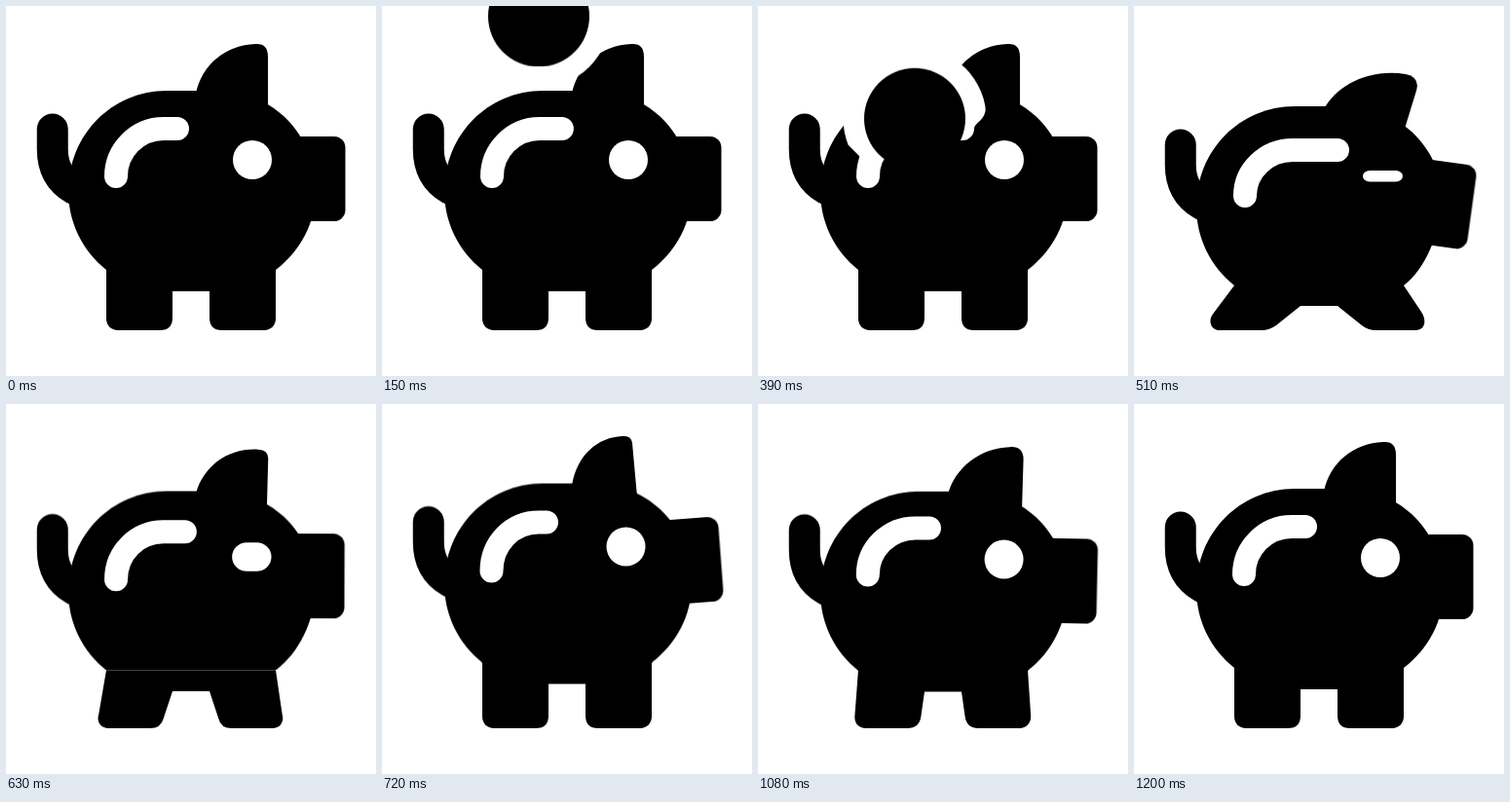
Animation, 380 px wide and 380 px high, one loop 1230 ms. Source, as an HTML page without scripts:

```html
<!DOCTYPE html>
<html lang="en">
<head>
<meta charset="utf-8">
<title>Piggy bank</title>
<style>
html, body { margin: 0; width: 100%; height: 100%; overflow: hidden; background: #fff; }
svg { display: block; width: 100vw; height: 100vh; }
.move { animation: 1230ms ease-in-out infinite; }

/* Poses: rest, squash 41.46%, stretch 58.54%, small squash 75.61%, rest */
.body { animation-name: body; }
@keyframes body {
  0%, 31.71%, 97.56%, 100% { transform: none; }
  41.46% { transform: translateY(16px); }
  58.54% { transform: translateY(-5.5px); }
  75.61% { transform: translateY(7px); }
}

.belly { animation-name: belly; }
@keyframes belly {
  0%, 31.71%, 58.54%, 97.56%, 100% { d: path("M165 87L217 87C274 87 318 132 318 190C318 222 303 251 277 271L103 271C79 252 64 223 64 190C64 132 109 87 165 87Z"); }
  41.46% { d: path("M165 87L217 87C274 87 318 132 318 190C312 218 300 254 277 271L103 271C79 252 64 223 64 190C64 132 109 87 165 87Z"); }
  75.61% { d: path("M165 87L217 87C274 87 318 132 318 190C315 220 301 253 277 271L103 271C79 252 64 223 64 190C64 132 109 87 165 87Z"); }
}

.snout { transform-origin: 348px 177.5px; animation-name: snout; }
@keyframes snout {
  0%, 31.71%, 97.56%, 100% { transform: translate(0, 0) rotate(0deg); }
  41.46% { transform: translate(-1.5px, 30px) rotate(7.8deg); }
  58.54% { transform: translate(-.5px, -18.7px) rotate(-4.3deg); }
  75.61% { transform: translate(-.5px, 12px) rotate(3deg); }
}

.ear { animation-name: ear; }
@keyframes ear {
  0%, 31.71%, 97.56%, 100% { d: path("M195 90C201 60 226 40 256 39Q269 38 269 52L269 130L200 130Z"); }
  41.46% { d: path("M195 106C208 82 240 64 279 70Q294 73 290 87L278 126L200 130Z"); }
  58.54% { d: path("M195 84C200 52 222 34 247 33Q256 32 257 40L262 95L200 130Z"); }
  75.61% { d: path("M195 97C205 72 232 53 262 52Q279 51 278 66L273 115L200 130Z"); }
}

.legs { animation-name: legs; }
@keyframes legs {
  0%, 31.71%, 97.56%, 100% { d: path("M103 270L103 321C103 328 108 333 115 333L158 333Q171 333 171 320L171 293L209 293L209 320Q209 333 222 333L265 333C272 333 277 328 277 321L277 270Z"); }
  41.46% { d: path("M103 287L82 315C75 323 79 333 88 333L131 333Q139 333 146 328L171 308L209 308L234 328Q240 333 249 333L289 333C299 333 301 323 295 314L277 287Z"); }
  58.54% { d: path("M103 265L103 321C103 328 108 333 115 333L158 333Q171 333 171 320L171 287.5L209 287.5L209 320Q209 333 222 333L265 333C272 333 277 328 277 321L277 265Z"); }
  75.61% { d: path("M103 277L94 319C92 327 96 333 104 333L146 333Q158 333 162 322L171 299L209 299L218 322Q222 333 233 333L274 333C282 333 286 327 285 319L277 277Z"); }
}

.eye { animation-name: eye; }
@keyframes eye {
  0%, 31.71%, 97.56%, 100% { x: 233px; y: 138px; width: 40px; height: 40px; rx: 20px; ry: 20px; }
  41.46% { x: 235px; y: 169px; width: 41px; height: 11.5px; rx: 7px; ry: 5.75px; }
  58.54% { x: 230.5px; y: 126.5px; width: 40px; height: 40px; rx: 20px; ry: 20px; }
  75.61% { x: 232px; y: 142px; width: 40px; height: 40px; rx: 20px; ry: 20px; }
}

/* The highlight widens into the coin slot */
.slot { animation-name: slot; }
@keyframes slot {
  0%, 8%, 97.56%, 100% { d: path("M113 175C113 148 135 126 162 126L176 126"); animation-timing-function: linear; }
  24.4%, 31.71% { d: path("M113 175C113 148 135 126 162 126L210 126"); }
  41.46% { d: path("M114 195C114 169 136 148 163 148L209 148"); }
  58.54% { d: path("M112.5 171.5C112.5 143 134 121.5 161 121.5L169 121.5"); }
  75.61% { d: path("M112.5 176C112.5 150 134 129.5 161 129.5L176 129.5"); }
}

.above { animation-name: above; }
@keyframes above {
  0%, 31.71%, 97.56%, 100% { transform: none; }
  41.46% { transform: translateY(22px); }
}

.coin { animation-name: drop; }
@keyframes drop {
  0% { transform: translateY(-60px); animation-timing-function: linear; }
  21.95% { transform: translateY(66px); animation-timing-function: cubic-bezier(.333, 0, .667, .333); }
  39.03% { transform: translateY(216px); animation-timing-function: step-start; }
  39.04%, 100% { transform: translateY(-140px); }
}
</style>
</head>
<body>
<svg viewBox="0 0 380 380">
  <clipPath id="above-slot">
    <path class="move above" d="M0 143H93L104 154L113 175C113 148 135 126 162 126H222C223 119 234 118 234 103H400V-200H0Z"/>
  </clipPath>

  <g class="move body">
    <path class="move belly"/>
    <path d="M47.75 126.5V147Q47.75 175 70 188" fill="none" stroke="#000" stroke-width="32" stroke-linecap="round"/>
  </g>
  <path class="move legs"/>
  <path class="move ear"/>
  <rect class="move snout" x="270" y="134" width="78.5" height="87" rx="11.5"/>

  <g clip-path="url(#above-slot)">
    <circle class="move coin" cx="161" r="73.5" fill="#fff"/>
  </g>
  <path class="move slot" fill="none" stroke="#fff" stroke-width="24" stroke-linecap="round"/>
  <circle class="move coin" cx="161" r="52"/>
  <rect class="move eye" fill="#fff"/>
</svg>
</body>
</html>
```
